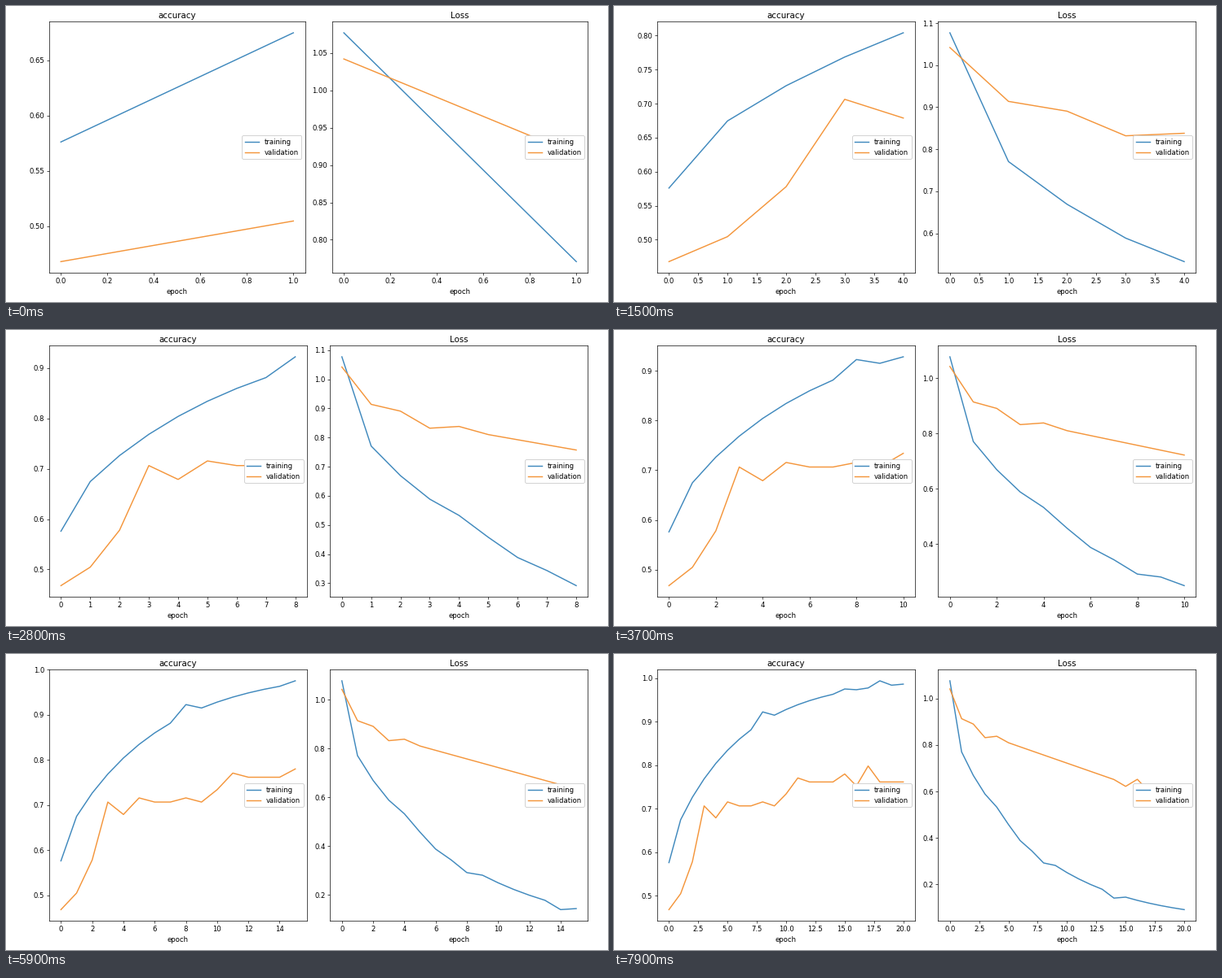
A matplotlib script that plays this animation: 738 px wide and 364 px high, repeating every 8 s.

```python
import numpy as np
import matplotlib.pyplot as plt
from matplotlib.animation import FuncAnimation

W, H, DPI = 738, 364, 61.5
LEFT, RIGHT, TOP, BOTTOM = 53, 713.4, 18.9, 328.4
EPOCHS, FRAMES, STEP = 20, 80, 100
FRAMES_PER_EPOCH = 4
BLUE, ORANGE = "#4089bd", "#f4963c"

plt.rcParams["font.family"] = "DejaVu Sans"

t = np.arange(EPOCHS + 1)


def decay(size, rate):
    return size * np.exp(-rate * t)


def rise(size, rate, middle):
    return size / (1 + np.exp(-rate * (t - middle)))


def with_bumps(trend, bumps):
    """Smooth trend with a few single-epoch deviations."""
    curve = trend.copy()
    for epoch, size in bumps.items():
        curve[epoch] += size
    return curve


train_acc = with_bumps(1 - decay(.382, .167) - decay(.042, 3),
                       {8: .023, 15: .0065, 18: .013})
# validation accuracy counts correct answers out of 109
hits = np.round(49.8 + rise(27, 1.5, 2) + rise(6.6, 3, 10))
val_acc = with_bumps(hits, {3: 5, 4: -2, 5: 1, 8: 1, 11: 1,
                            15: 2, 16: -1, 17: 4}) / 109
train_loss = with_bumps(.035 + decay(.83, .135) + decay(.212, 3),
                        {4: .014, 6: -.016, 7: -.014, 8: -.025, 14: -.02})
val_loss = with_bumps(.898 - .0176 * t + decay(.144, 1.46),
                      {2: .02, 3: -.015, 4: .01, 15: -.012, 16: .036})

fig = plt.figure(figsize=(W / DPI, H / DPI), dpi=DPI, facecolor="white")
axes = [fig.add_axes([0, 0, 1, 1], label=name) for name in ("acc", "loss")]


def place(ax, x0, x1):
    ax.set_position([x0 / W, 1 - BOTTOM / H, (x1 - x0) / W, (BOTTOM - TOP) / H])


def plot(ax, title, train, val, epoch):
    ax.clear()
    shown = slice(epoch + 1)
    ax.plot(t[shown], train[shown], color=BLUE, lw=1.7, label="training")
    ax.plot(t[shown], val[shown], color=ORANGE, lw=1.7, label="validation")
    ax.set_title(title, pad=4)
    ax.set_xlabel("epoch")
    ax.legend(loc="center right", framealpha=1)


def update(frame):
    epoch = 1 + frame // FRAMES_PER_EPOCH
    # two-decimal loss labels need a wider gap between the panels
    width = 313.5 if epoch == 1 else 316
    place(axes[0], LEFT, LEFT + width)
    place(axes[1], RIGHT - width, RIGHT)
    plot(axes[0], "accuracy", train_acc, val_acc, epoch)
    plot(axes[1], "Loss", train_loss, val_loss, epoch)
    return axes


anim = FuncAnimation(fig, update, frames=FRAMES, interval=STEP,
                     repeat=True, repeat_delay=0, blit=False)
plt.show()
```
